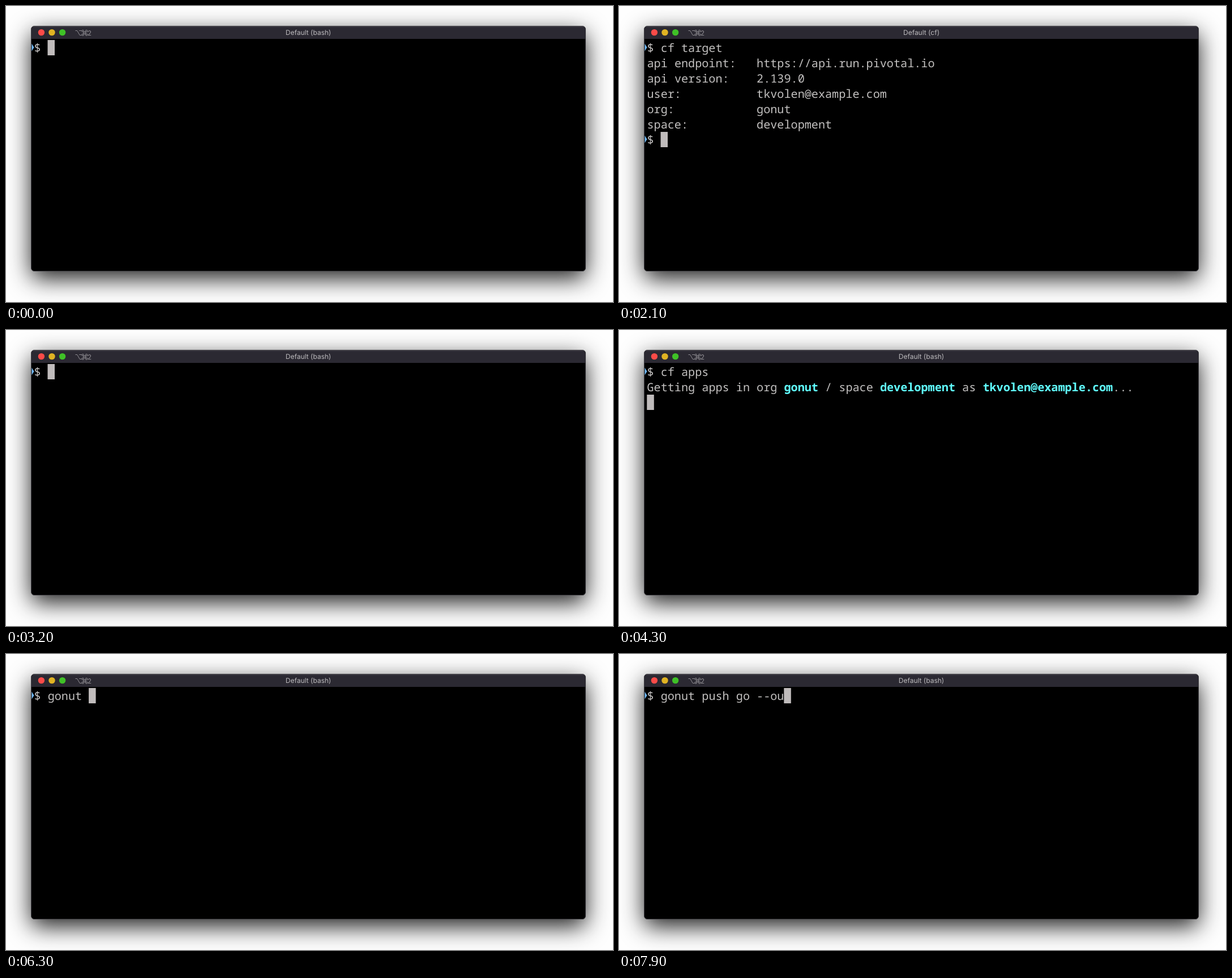
An HTML page that plays this animation: 1072x522 px, repeating every 8000 ms.

```html
<!DOCTYPE html>
<html lang="en">
<head>
<meta charset="utf-8">
<title>Terminal session</title>
<style>
  html, body { margin: 0; width: 100%; height: 100%; overflow: hidden; background: #fefefe; }
  #window {
    position: absolute; left: 44px; top: 35px; width: 980px; height: 433px;
    box-sizing: border-box; border: 1px solid #3e3d42; border-radius: 6px;
    background: #000; overflow: hidden;
  }
  #shadow {
    position: absolute; left: 45px; top: 36px; width: 978px; height: 431px;
    border-radius: 6px; box-shadow: 0 13px 42px rgba(0, 0, 0, .9);
  }
  #bar { height: 22px; background: #2b2932; box-shadow: inset 0 1px #46444c; }
  svg { position: absolute; left: 0; top: 0; text-rendering: geometricPrecision; }
  #title { font: 12px Inter, sans-serif; fill: #bdbbbe; text-anchor: middle; }
  #tab { font: 12px Inter, sans-serif; fill: #918f94; }
  #keys { fill: none; stroke: #918f94; }
  #screen { font: 20.167px "Noto Sans Mono", monospace; fill: #c3c1c0; }
  #screen .cyan { fill: #60fdff; font-weight: 600; }
  #screen .green { fill: #60fa68; font-weight: 600; }
  #screen .mark { fill: #74bdf8; }
  #cursor { fill: #c0bcbc; }
</style>
</head>
<body>
<div id="shadow"></div>
<div id="window"><div id="bar"></div></div>
<svg width="1072" height="522" viewBox="0 0 1072 522">
  <circle cx="62.4" cy="46.6" r="5.7" fill="#fc4b48"/>
  <circle cx="81" cy="46.6" r="5.7" fill="#e0b323"/>
  <circle cx="99.6" cy="46.6" r="5.7" fill="#3fc127"/>
  <g id="keys">
    <path d="M122.5 43.5h3.2l4.6 8h3.4M129.2 43.5h4.5"/>
    <path transform="translate(132.6 41) scale(.53)" stroke-width="1.9"
      d="M15 6v12a3 3 0 1 0 3-3H6a3 3 0 1 0 3 3V6a3 3 0 1 0-3 3h12a3 3 0 1 0-3-3"/>
  </g>
  <text id="tab" x="143.8" y="51.5">2</text>
  <text id="title" x="534" y="51"></text>
  <g id="screen"></g>
  <rect id="cursor" width="12.5" height="27"/>
</svg>
<script>
const LOOP = 8000, TICK = 100;
const LEFT = 49.5, TOP = 60, CELL = 12.1, ROW = 27;
const PROMPT = '›$ ';
const USER = 'tkvolen@example.com';
// Inline style switches inside printed text
const STYLES = { '^': 'cyan', '`': 'green', '|': '' };

const events = [];
const print = (at, text) => events.push({ at, text });
const clear = at => events.push({ at, clear: true, text: PROMPT });
const title = (at, name) => events.push({ at, title: name });
const type = (at, step, text) =>
  [...text].forEach((ch, i) => print(at + i * step, ch));

clear(0);
title(0, 'bash');
type(300, 120, 'cf target');
print(1500, '\n');
title(1800, 'cf');
print(1900, [
  'api endpoint:   https://api.run.pivotal.io',
  'api version:    2.139.0',
  'user:           ' + USER,
  'org:            gonut',
  'space:          development',
  PROMPT
].join('\n'));
title(2500, 'bash');
clear(2900);

type(3300, 100, 'cf apps');
print(4100, '\n');
print(4200, `Getting apps in org ^gonut| / space ^development| as ^${USER}|...\n`);
title(4500, 'cf');
print(4600, '`OK|\n\nNo apps found\n' + PROMPT);
print(4900, '\n' + PROMPT);
print(5100, '\n' + PROMPT);
title(5200, 'bash');
clear(5500);

type(5650, 120, 'gonut push ');
type(7100, 120, 'go --ou');
events.sort((a, b) => a.at - b.at);

const $ = id => document.getElementById(id);
const screen = $('screen');

function add(tag, attrs, text = '') {
  const el = document.createElementNS('http://www.w3.org/2000/svg', tag);
  for (const key in attrs) el.setAttribute(key, attrs[key]);
  el.textContent = text;
  screen.append(el);
}

function stateAt(time) {
  let text = '', name = '';
  for (const e of events) {
    if (e.at > time) break;
    if (e.clear) text = '';
    text += e.text || '';
    name = e.title || name;
  }
  return { text, name };
}

function draw(text) {
  screen.replaceChildren();
  let row = 0, col = 0, style = '', word = '';
  const flush = () => {
    if (word) add('text', {
      x: LEFT + (col - word.length) * CELL,
      y: TOP + row * ROW + 20.5,
      class: style
    }, word);
    word = '';
  };
  for (const ch of text) {
    if (ch === '\n') {
      flush();
      row++;
      col = 0;
    } else if (ch in STYLES) {
      flush();
      style = STYLES[ch];
    } else if (ch === '›') {
      const y = TOP + row * ROW;
      add('path', { class: 'mark', d: `M45.5 ${y + 6.5}l4 6.5l-4 6.5z` });
    } else if (ch === ' ') {
      flush();
      col++;
    } else {
      word += ch;
      col++;
    }
  }
  flush();
  $('cursor').setAttribute('x', LEFT + col * CELL - .2);
  $('cursor').setAttribute('y', TOP + row * ROW);
}

let shown = null;
function frame() {
  const time = Math.floor(performance.now() % LOOP / TICK) * TICK;
  const { text, name } = stateAt(time);
  if (text + name !== shown) {
    shown = text + name;
    $('title').textContent = `Default (${name})`;
    draw(text);
  }
  requestAnimationFrame(frame);
}
frame();
</script>
</body>
</html>
```
